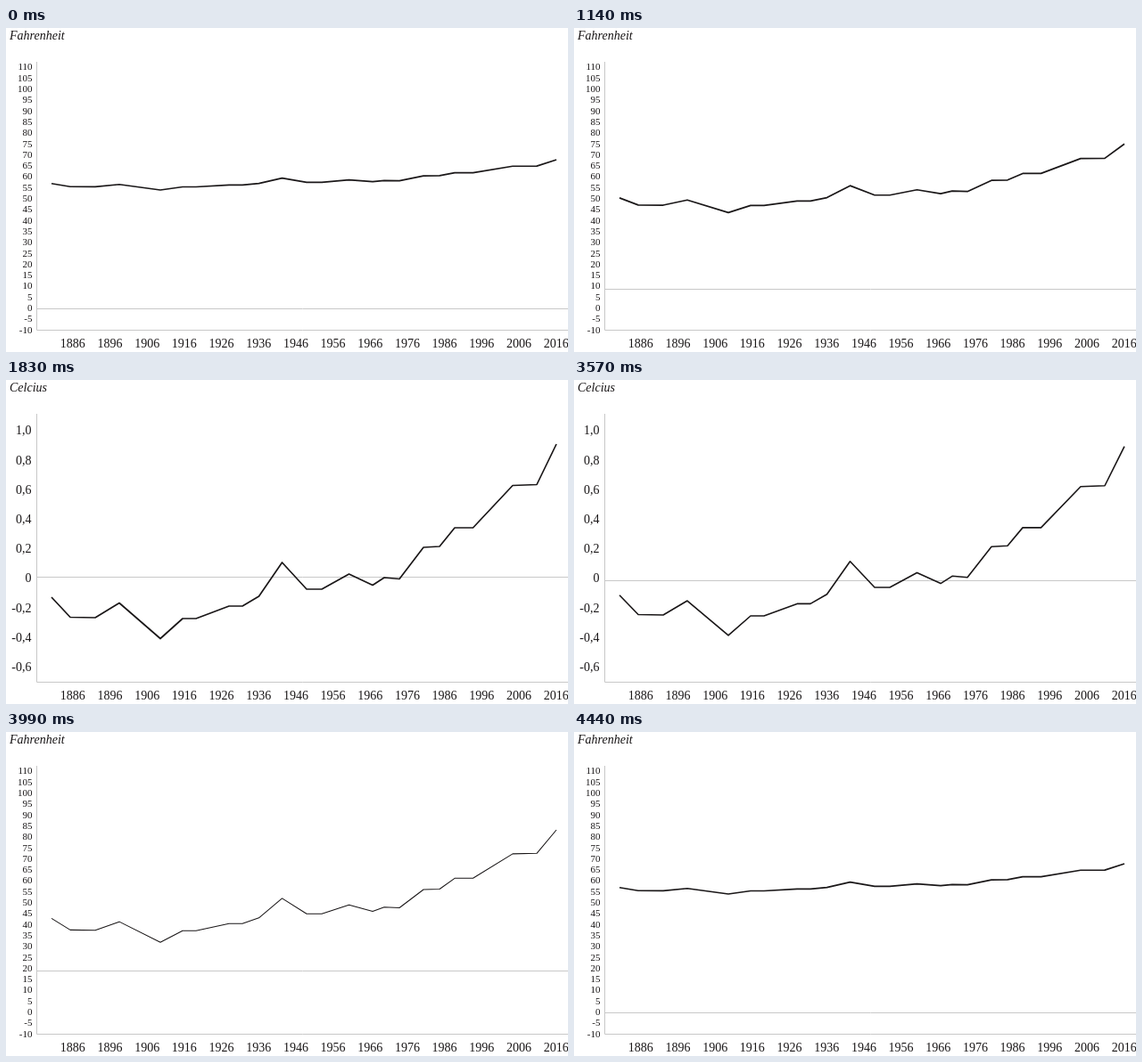
Recreate the animation shown at these times as an HTML page with a canvas. Size 630 by 364 pixels, loop 5.4 s.

```html
<!DOCTYPE html>
<html lang="en">
<head>
<meta charset="utf-8">
<title>Temperature scales</title>
<style>
  html, body { margin: 0; width: 630px; height: 364px; overflow: hidden; background: #fff; }
  canvas { display: block; }
</style>
</head>
<body>
<canvas id="stage" width="630" height="364"></canvas>
<script>
const ctx = document.getElementById("stage").getContext("2d");
const SERIF = "'Liberation Serif', 'Times New Roman', serif";
const INK = "#1a1718", RULE = "#c8c8c8";
const LOOP = 5400, STEP = 30, MORPH = 900;
const RISE = 930, FALL = 3540;

// Turning points on the Celsius scale; the Fahrenheit curve is a flattened copy.
const curve = [
  [51, 244], [72, 266.5], [100, 267], [127, 250.5], [173, 290.5], [198, 268],
  [213, 268], [250, 254], [265, 254], [283.5, 243], [309.5, 205], [337, 235],
  [354, 235], [384.5, 218], [411, 230.5], [424, 222], [441, 223.5], [468, 188],
  [486, 187], [503, 166], [523.5, 166], [568, 118.5], [595, 117.5], [617, 72]
];
const flatten = y => 182 - (290.5 - y) * 0.1556;

// 0 is the Fahrenheit pose, 1 the Celsius pose.
function progress(t) {
  const p = t < FALL ? (t - RISE) / MORPH : 1 - (t - FALL) / MORPH;
  return Math.min(1, Math.max(0, p));
}

function text(str, x, y, size, align, style = "") {
  ctx.font = `${style} ${size}px ${SERIF}`;
  ctx.textAlign = align;
  ctx.fillText(str, x, y);
}

function path(points, color, width) {
  ctx.beginPath();
  for (const [x, y] of points) ctx.lineTo(x, y);
  ctx.strokeStyle = color;
  ctx.lineWidth = width;
  ctx.stroke();
}

function drawLabels(celsius) {
  ctx.fillStyle = INK;
  text(celsius ? "Celcius" : "Fahrenheit", 4, 13, 14, "left", "italic");
  if (celsius) {
    for (let i = 0; i < 9; i++) {
      const v = 10 - 2 * i;
      const label = v ? (v / 10).toFixed(1).replace(".", ",") : "0";
      text(label, 28.5, 61.3 + 33.2 * i, 14, "right");
    }
  } else {
    for (let i = 0; i < 25; i++) text(110 - 5 * i, 29.5, 47.4 + 12.3 * i, 11, "right");
  }
  for (let i = 0; i < 14; i++) text(1886 + 10 * i, 74.8 + 41.68 * i, 359, 14, "center");
}

function draw(t) {
  const p = progress(t);
  ctx.fillStyle = "#fff";
  ctx.fillRect(0, 0, 630, 364);

  const zero = Math.ceil(314.9 - 94 * p) + 0.5;
  path([[34.5, 38], [34.5, 339.5], [630, 339.5]], RULE, 1);
  path([[35, zero], [630, zero]], RULE, 1);
  drawLabels(p > 0.96);

  // The stroke thins midway on the return.
  const thin = t >= FALL ? 2.6 * p * (1 - p) : 0;
  const points = curve.map(([x, y]) => [x, flatten(y) + (y - flatten(y)) * p]);
  ctx.lineJoin = "round";
  path(points, INK, 1.7 - thin);
}

const start = performance.now();
function tick() {
  const t = (performance.now() - start) % LOOP;
  draw(Math.floor(t / STEP) * STEP);
  requestAnimationFrame(tick);
}
tick();
</script>
</body>
</html>
```
